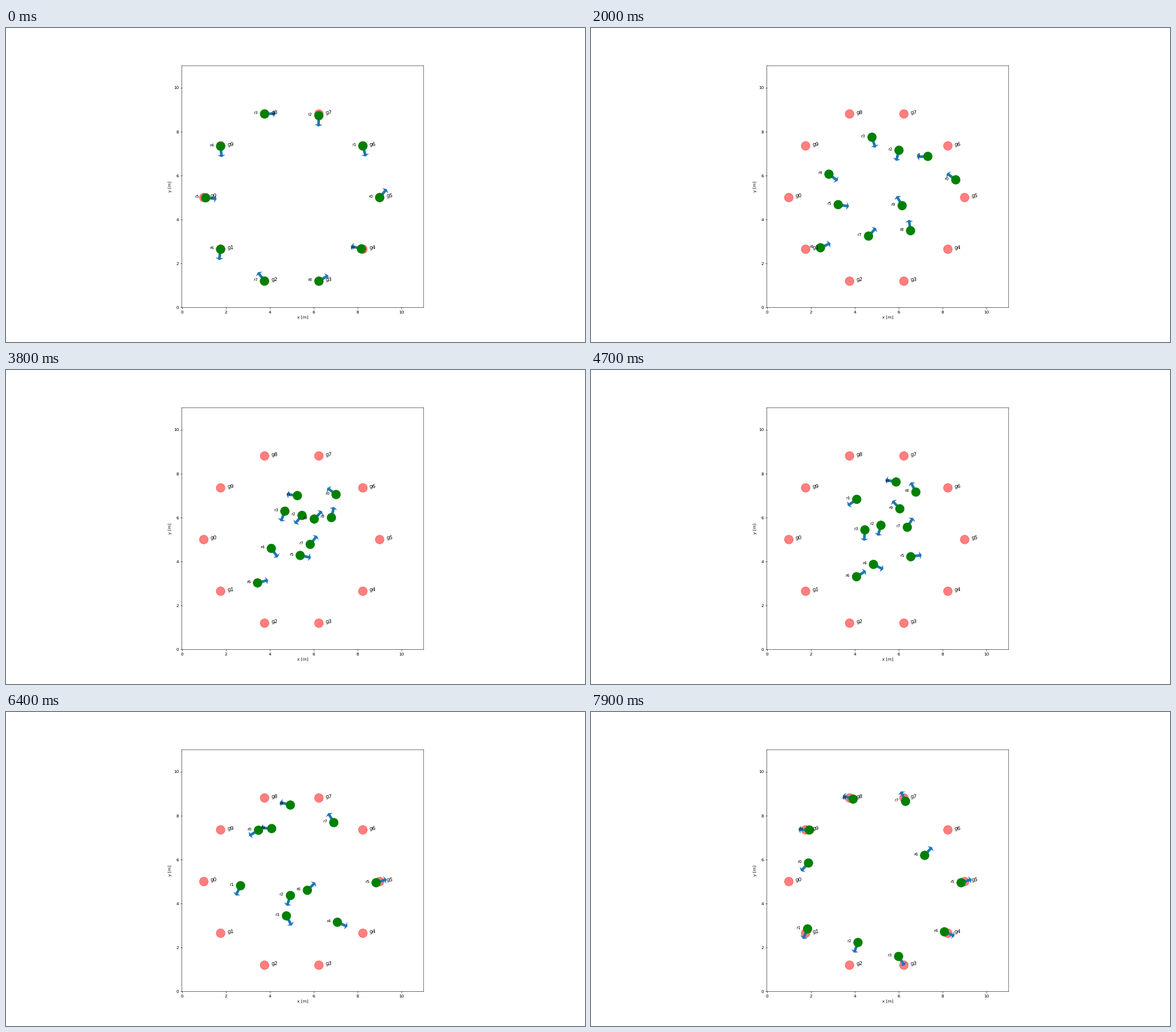
Animation of 1016x551 px, one loop 8 s. Source, as a matplotlib script:

```python
import numpy as np
import matplotlib.pyplot as plt
from matplotlib.animation import FuncAnimation
from matplotlib.patches import Arrow, Circle

DPI = 52.9
N = 10
FRAMES = 80
RADIUS = 0.2
ARROW_LEN, ARROW_WIDTH = 0.5, 0.6
CRUISE = 0.142      # metres per frame on the last leg
TOLERANCE = 0.17    # distance from the goal at which a robot parks
VIA_TIMES = [28, 47, 58]

# Start heading in degrees, then three points on the way through the crowd
ROBOTS = [
    (51, (8.01, 6.23), (5.88, 7.62), (4.25, 7.63)),
    (-75, (6.55, 6.84), (4.09, 6.83), (3.09, 5.56)),
    (-92, (5.83, 6.61), (5.19, 5.65), (5.12, 4.98)),
    (2, (4.90, 7.09), (4.46, 5.44), (4.48, 4.16)),
    (-85, (3.42, 5.53), (4.85, 3.87), (6.29, 3.46)),
    (-6, (4.16, 4.54), (6.55, 4.22), (8.07, 4.70)),
    (-98, (2.89, 2.90), (4.08, 3.31), (5.13, 4.08)),
    (127, (5.27, 4.02), (6.39, 5.56), (7.15, 6.92)),
    (32, (6.47, 4.59), (6.78, 7.16), (5.71, 8.17)),
    (165, (5.78, 5.41), (6.05, 6.40), (4.87, 7.24)),
]


def polar(angle, r=1.0):
    return r * np.array([np.cos(angle), np.sin(angle)])


def ring(i):
    return 5 + polar(2 * np.pi * i / N, 4)


class Track:
    """Smooth path across the ring; the heading is its tangent."""

    def __init__(self, i, heading, *via):
        facing = polar(np.radians(heading))
        home, goal = ring(i), ring(i + N / 2)
        # A robot already facing its goal moves off at once
        aim = max(0, facing @ (goal - home) / 8)
        start = home + 0.09 * aim ** 4 * facing

        leg = goal - via[-1]
        dist = np.hypot(*leg)
        end = goal - TOLERANCE * leg / dist
        self.stop = VIA_TIMES[-1] + (dist - TOLERANCE) / CRUISE
        self.times = np.array([0, *VIA_TIMES, self.stop])
        self.pts = np.array([start, *via, end])
        self.vel = np.gradient(self.pts, self.times, axis=0)
        self.vel[0] = np.hypot(*self.vel[0]) * facing

    def pose(self, frame):
        t = min(frame, self.stop)
        k = max(np.searchsorted(self.times, t) - 1, 0)
        dt = self.times[k + 1] - self.times[k]
        s = (t - self.times[k]) / dt
        p, d = self.pts[k], self.pts[k + 1] - self.pts[k]
        m, n = self.vel[k] * dt, self.vel[k + 1] * dt
        pos = (p + s * s * (3 - 2 * s) * d
               + s * (1 - s) ** 2 * m - s * s * (1 - s) * n)
        tangent = (6 * s * (1 - s) * d + (1 - s) * (1 - 3 * s) * m
                   + s * (3 * s - 2) * n)
        return pos, tangent / np.hypot(*tangent)


plt.rcParams.update({"font.family": "DejaVu Sans", "text.hinting": "none"})
fig, ax = plt.subplots(figsize=(1016.01 / DPI, 551.01 / DPI), dpi=DPI)
ax.set_aspect("equal")
ax.set(xlim=(0, 11), ylim=(0, 11), xlabel="x [m]", ylabel="y [m]",
       xticks=range(0, 11, 2), yticks=range(0, 11, 2))
for spine in ax.spines.values():
    spine.set_snap(False)

tracks = [Track(i, *row) for i, row in enumerate(ROBOTS)]
bodies, arrows, labels = [], [], []
for i in range(N):
    gx, gy = ring(i + N / 2)
    ax.add_patch(Circle((gx, gy), RADIUS, color="r", alpha=0.5, zorder=1))
    ax.text(gx + 0.3, gy, f"g{i}", fontsize=12, color="k", zorder=4)
    arrows.append(ax.add_patch(Arrow(0, 0, ARROW_LEN, 0, width=ARROW_WIDTH, zorder=2)))
    bodies.append(ax.add_patch(Circle((0, 0), RADIUS, color="g", zorder=3)))
    labels.append(ax.text(0, 0, f"r{i}", fontsize=10, color="k", zorder=4))


def update(frame):
    for track, body, arrow, label in zip(tracks, bodies, arrows, labels):
        (x, y), (c, s) = track.pose(frame)
        body.center = x, y
        arrow.set_data(x=x, y=y, dx=ARROW_LEN * c, dy=ARROW_LEN * s)
        label.set_position((x - 0.5, y))
    return bodies + arrows + labels


anim = FuncAnimation(fig, update, frames=FRAMES, interval=100, repeat=True)
plt.show()
```
